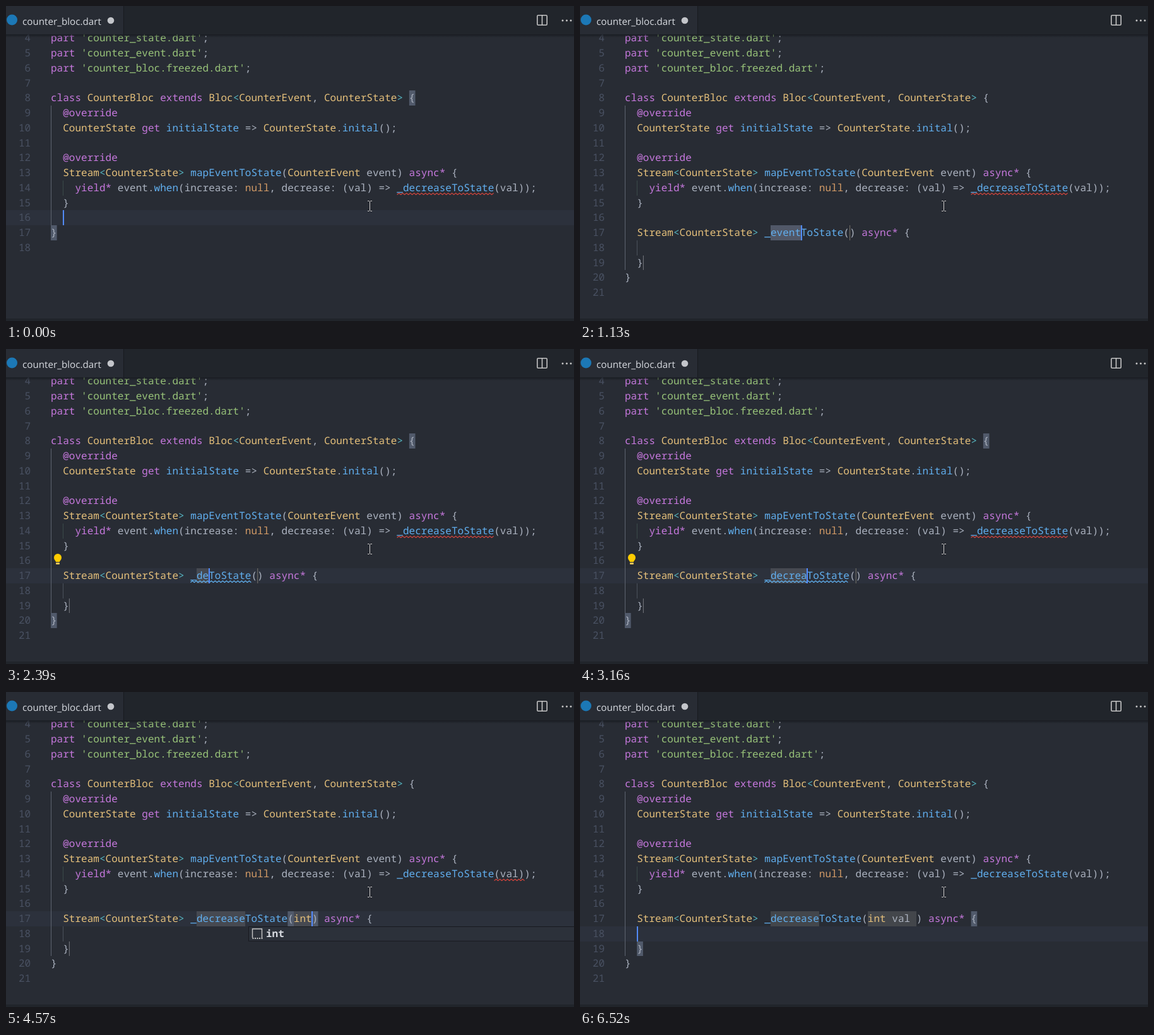
Recreate the animation shown at these times as an HTML page. Size 900 px wide and 500 px high, loop 6.84 s.

```html
<!DOCTYPE html>
<html lang="en">
<head>
<meta charset="utf-8">
<title>Editor snippet</title>
<style>
  html, body { margin: 0; height: 100%; overflow: hidden; background: #282c34; }
  svg { display: block; }
  text { font: 16.04px "Noto Sans Mono", monospace; white-space: pre; fill: #abb2bf; text-rendering: geometricPrecision; }
  .tab { font: 15.2px "Open Sans", "Noto Sans", sans-serif; fill: #d7dae0; }
  .num { fill: #495162; text-anchor: end; }
  .detail { fill: #8a909b; }
  .match { fill: #d7dae0; font-weight: 700; }
  .str { fill: #98c379; }
  .key { fill: #c678dd; }
  .type { fill: #e5c07b; }
  .const { fill: #d19a66; }
  .func { fill: #61afef; }
  .op { fill: #56b6c2; }
</style>
</head>
<body>
<svg width="900" height="500" viewBox="0 0 900 500">
  <defs>
    <linearGradient id="shade" x2="0" y2="1">
      <stop stop-color="#14171c" stop-opacity=".75"/>
      <stop offset="1" stop-color="#14171c" stop-opacity="0"/>
    </linearGradient>
  </defs>
  <rect width="900" height="500" fill="#282c34"/>
  <rect y="496" width="900" height="4" fill="#21252b"/>
  <g id="code"></g>
  <rect y="45" width="900" height="5" fill="url(#shade)"/>
  <rect width="900" height="45" fill="#21252b"/>
  <rect width="186" height="45" fill="#282c34"/>
  <rect x="186" width="1" height="45" fill="#181a1f"/>
  <circle cx="9.5" cy="22" r="8.5" fill="#1c78b6"/>
  <text class="tab" x="26" y="30">counter_bloc.dart</text>
  <circle cx="166" cy="23" r="5.3" fill="#c3c5ca"/>
  <g fill="none" stroke="#c5c5c5" stroke-width="1.6">
    <rect x="841.8" y="14.8" width="15.4" height="15.4" rx="1.5"/>
    <path d="M849.5 15v15"/>
  </g>
  <g fill="#c5c5c5">
    <circle cx="882" cy="23" r="1.5"/><circle cx="888.5" cy="23" r="1.5"/><circle cx="895" cy="23" r="1.5"/>
  </g>
  <g id="popup"></g>
  <g fill="none">
    <path d="M573 309.5h2.5l1 1 1-1h2.5M576.5 310.500v14M573 325.500h2.500l1-1 1 1h2.500" stroke="#181a1f" stroke-width="2.500" opacity=".5"/>
    <path d="M573 309.500h2.500l1 1 1-1h2.500M576.500 310.500v14M573 325.500h2.500l1-1 1 1h2.500" stroke="#d4d4d4"/>
  </g>
</svg>
<script>
const LOOP = 6840, CHAR = 9.625, ROW = 23.75, LEFT = 71;
const FIRST = 4;
const head = `part 'counter_state.dart';
part 'counter_event.dart';
part 'counter_bloc.freezed.dart';

class CounterBloc extends Bloc<CounterEvent, CounterState> {
  @override
  CounterState get initialState => CounterState.inital();

  @override
  Stream<CounterState> mapEventToState(CounterEvent event) async* {
    yield* event.when(increase: null, decrease: (val) => _decreaseToState(val));
  }`.split('\n');

// Each step patches the state that came before it.
const steps = [
  [0, { focus: 'blank', typed: '', name: '', arg: '', caret: true, pair: 'class', error: 'name' }],
  [150, { focus: 'typed' }],
  [440, { typed: 'f' }],
  [520, { typed: 'fm' }],
  [750, { typed: 'fma', list: 'typed' }],
  [830, { typed: 'fmap' }],
  [910, { typed: 'fmapT' }],
  [1130, { focus: 'name', name: 'event', selected: true, list: '', pair: '' }],
  [1220, { marks: true, warn: true }],
  [1620, { caret: false }],
  [1690, { bulb: true }],
  [2150, { caret: true }],
  [2320, { name: 'd', selected: false, marks: false }],
  [2390, { name: 'de', pair: 'class' }],
  [2600, { name: 'dec' }],
  [2780, { name: 'decr' }],
  [2860, { name: 'decre' }],
  [3160, { name: 'decrea' }],
  [3330, { name: 'decreas' }],
  [3400, { name: 'decrease', warn: false, error: 'args' }],
  [3880, { caret: false }],
  [4110, { focus: 'arg', caret: true, pair: 'args' }],
  [4420, { arg: 'i', bulb: false, list: 'int' }],
  [4500, { arg: 'in' }],
  [4570, { arg: 'int' }],
  [4650, { arg: 'int ', list: '', error: '' }],
  [4880, { arg: 'int v', list: 'val' }],
  [4960, { arg: 'int va' }],
  [5030, { arg: 'int val' }],
  [5200, { arg: 'int val ', list: '' }],
  [5600, { focus: 'body', pair: 'body' }],
  [6060, { caret: false }],
  [6520, { caret: true }]
];

const lists = {
  typed: { x: 100, items: ['fmapToState', 'fmapEvent', 'fmapUnion', 'fmapList'] },
  int: { x: 384, items: ['int', 'inital', 'indexed', 'if', 'import', 'is'] },
  val: { x: 384, items: ['valueListenableBuilder'], detail: 'Given a ValueListenab…' }
};

const X = col => LEFT + col * CHAR;
const Y = line => Math.round(348 + (line - 17) * ROW);
const esc = s => s.replace(/&/g, '&amp;').replace(/</g, '&lt;');
const rect = (x, y, w, h, fill, more = '') =>
  `<rect x="${x}" y="${y}" width="${w}" height="${h}" fill="${fill}" ${more}/>`;
const block = (line, col, n, fill) => rect(X(col), Y(line), n * CHAR, Y(line + 1) - Y(line), fill);
const bracket = (line, col) => block(line, col, 1, '#515a6b');
const stop = (line, col, n) => block(line, col, n, 'rgba(124,124,124,.32)');
const bar = (x, from, to, fill, w = 1) => rect(x, Y(from), w, Y(to) - Y(from), fill);
const frame = (line, col) =>
  rect(Math.round(X(col)) + .5, Y(line) + .5, 48, 23, 'none', 'stroke="#d8d8d8"');

function squiggle(line, col, n, color) {
  const x = X(col), y = Y(line + 1) - 1.5;
  let d = `M${x} ${y}`;
  for (let i = 3; i <= n * CHAR; i += 3) d += `L${x + i} ${y - (i % 2) * 2.5}`;
  return `<path d="${d}" fill="none" stroke="${color}" stroke-width="1.2"/>`;
}

const kinds = ['str', 'key', 'type', 'const', 'func', 'op'];
const grammar = /=>|('[^']*')|(@override|\b(?:part|class|extends|get|yield|async)\b\*?)|(\b(?:[A-Z]\w*|int)\b)|(\bnull\b)|(\b[a-z_]\w*(?=\(| =>))|([<>])/g;

function paint(code) {
  let out = '', last = 0;
  for (const m of code.matchAll(grammar)) {
    const kind = kinds[m.slice(1).findIndex(Boolean)] || '';
    out += esc(code.slice(last, m.index)) + `<tspan class="${kind}">${esc(m[0])}</tspan>`;
    last = m.index + m[0].length;
  }
  return out + esc(code.slice(last));
}

function popup(s) {
  if (!s.list) return '';
  const { x, items, detail } = lists[s.list];
  const word = s.list === 'typed' ? s.typed : s.arg.split(' ').pop();
  const rows = items.filter(item => item.startsWith(word));
  let out = rect(x + .5, 372.5, 565, rows.length * ROW - 1, '#21252b', 'stroke="#181a1f"')
    + rect(x + 1, 373, 564, ROW - 2, '#2c313a');
  rows.forEach((item, i) => {
    const y = 372 + i * ROW, left = x + 6.5;
    out += `<path d="M${left} ${y + 18}v-14h15v14" fill="none" stroke="#c5c5c5" stroke-width="1.4"/>
      <path d="M${left} ${y + 19}h16" stroke="#c5c5c5" stroke-width="2" stroke-dasharray="2 1.500"/>
      <text x="${x + 28}" y="${y + 17}"><tspan class="match">${word}</tspan>${item.slice(word.length)}</text>`;
  });
  return out + (detail ? `<text class="detail" x="${x + 303}" y="389">${detail}</text>` : '');
}

function code(s) {
  const expanded = s.name !== '';
  const open = 24 + s.name.length + 7, argCol = open + 1, close = argCol + s.arg.length;
  const rows = s.focus === 'blank' ? [''] : expanded
    ? ['', `  Stream<CounterState> _${s.name}ToState(${s.arg}) async* {`, '', '  }']
    : ['', s.typed && '  ' + s.typed];
  const lines = [...head, ...rows, '}', ''];
  const end = FIRST + lines.length - 2;
  const [line, col] = {
    blank: [16, 2], typed: [17, 2 + s.typed.length], name: [17, 24 + s.name.length],
    arg: [17, close], body: [18, 2]
  }[s.focus];

  let out = s.selected ? '' : rect(0, Y(line), 900, 24, '#2c313c');
  out += bar(71, 9, end, '#5d6470') + bar(90, 14, 15, '#3b4a4a');

  if (expanded) {
    out += bar(90, 18, 19, '#4b515c') + stop(17, 24, s.name.length);
    if (s.selected) out += block(17, 24, 5, 'rgba(103,118,150,.38)');
    if (s.arg) out += stop(17, argCol, s.arg.length);
    else out += bar(X(argCol), 17, 18, '#77746a');
    if (s.focus !== 'body') out += bar(X(3), 19, 20, '#777a80');
  }
  if (s.pair === 'class') out += bracket(8, 59) + bracket(end, 0);
  if (s.pair === 'args') out += bracket(17, open) + bracket(17, close);
  if (s.pair === 'body') out += bracket(17, close + 9) + bracket(19, 2);

  lines.forEach((text, i) => {
    const y = Y(FIRST + i) + 17;
    out += `<text class="num" x="39.200" y="${y}">${FIRST + i}</text><text x="${LEFT}" y="${y}">${paint(text)}</text>`;
  });

  if (s.error === 'name') out += squiggle(14, 57, 16, '#d0443c');
  if (s.error === 'args') out += squiggle(14, 73, 5, '#d0443c');
  if (!expanded && s.typed.length > 1) out += squiggle(17, 2, s.typed.length, '#d0443c');
  if (s.warn) out += squiggle(17, 23, 8 + s.name.length, '#61b4f5');
  if (s.marks) {
    for (const [l, c] of [[5, 14], [8, 38], [13, 26], [13, 46], [13, 52], [14, 11]]) out += frame(l, c);
  }
  if (s.bulb) {
    out += `<path d="M79 338c0-2-3-3-3-7a6 6 0 0 1 12 0c0 4-3 5-3 7z" fill="#ffcc00"/>`
      + rect(79, 339, 6, 3, '#e8c35a', 'rx="1"');
  }
  if (s.caret) out += bar(Math.floor(X(col)), line, line + 1, '#528bff', 2);
  return out;
}

const codeLayer = document.getElementById('code'), popupLayer = document.getElementById('popup');
let shown = 0;

function draw(now) {
  const t = now % LOOP;
  const past = steps.filter(([at]) => at <= t);
  if (past.length !== shown) {
    shown = past.length;
    const state = Object.assign({}, ...past.map(step => step[1]));
    codeLayer.innerHTML = code(state);
    popupLayer.innerHTML = popup(state);
  }
}

const start = performance.now();
function tick() {
  draw(performance.now() - start);
  requestAnimationFrame(tick);
}
tick();
</script>
</body>
</html>
```
